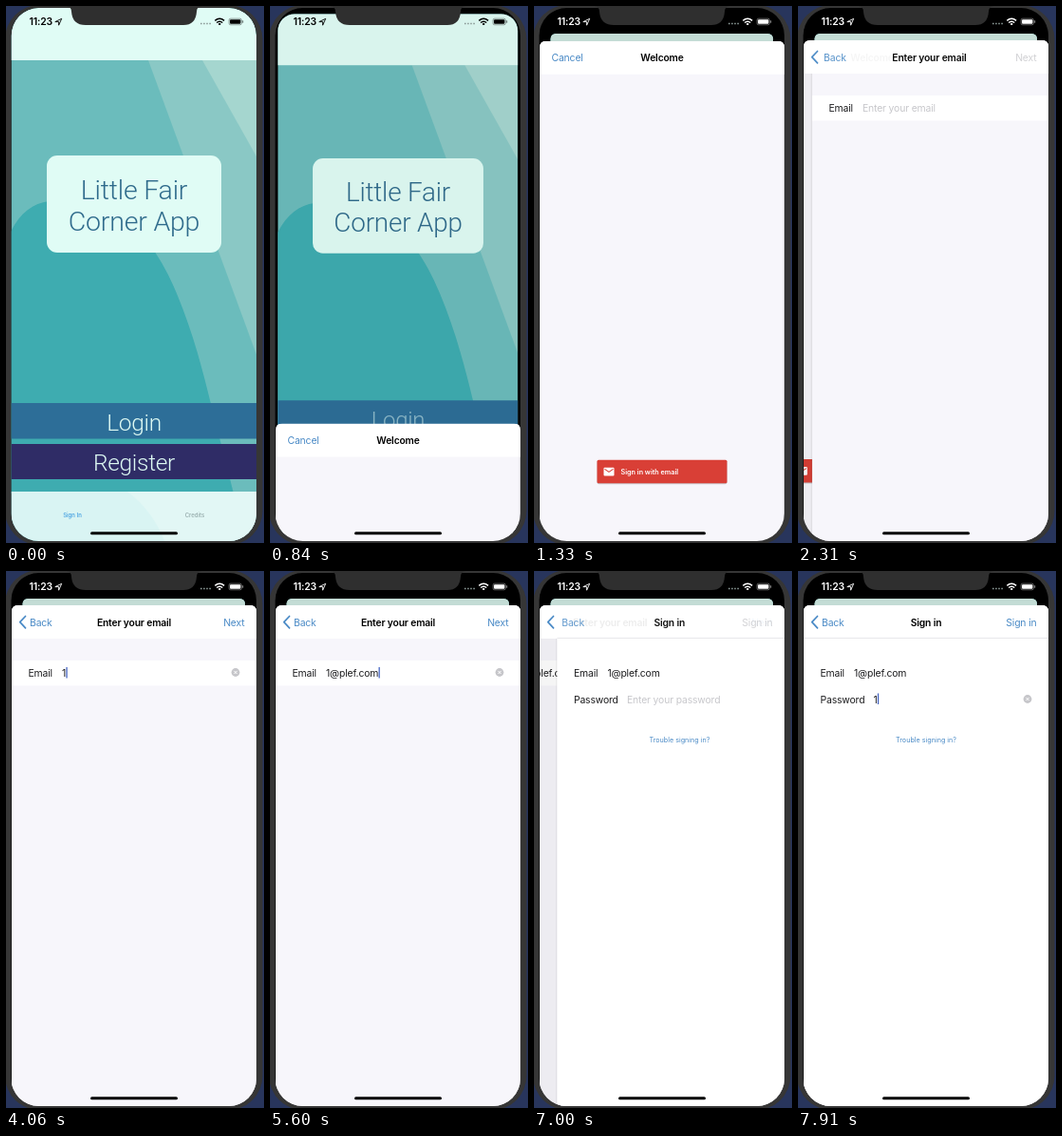
Animation, 272 px wide and 564 px high, one loop 8 s. Source, as an HTML page:

```html
<!DOCTYPE html>
<html lang="en">
<head>
<meta charset="utf-8">
<title>Sign-in walkthrough</title>
<style>
  html, body { margin: 0; width: 100%; height: 100%; overflow: hidden; background: #28355c; }
  svg { display: block; width: 272px; height: 564px; }
  text { font: 400 10.4px Inter, "Liberation Sans", sans-serif; fill: #1c1c1e; letter-spacing: -.15px; white-space: pre; }
  .blue { fill: #4a8ac6; }
  .off { fill: #cfcfd2; }
  .title { font-weight: 600; font-size: 10.3px; fill: #000; text-anchor: middle; }
  .end { text-anchor: end; }
  .hint { fill: #c7c7cb; }
  .thin { font: 300 28.5px Roboto, "Liberation Sans", sans-serif; letter-spacing: -.2px; text-anchor: middle; }
  .btn { font-size: 24.5px; letter-spacing: -.3px; fill: #dcf8f2; }
  .tiny { font-size: 6px; text-anchor: middle; letter-spacing: 0; }
</style>
</head>
<body>
<svg viewBox="0 0 272 564">
  <defs>
    <clipPath id="screen"><rect x="5.5" y="2" width="258.5" height="560" rx="29"/></clipPath>
    <clipPath id="sheetBox"><path d="M6 562V43q0-7 7-7H257q7 0 7 7V562z"/></clipPath>
    <clipPath id="homeBox"><rect id="homeRect" x="5.5" y="2" width="258.5" height="562" rx="6"/></clipPath>
    <clipPath id="backBox"><rect x="15" y="40" width="120" height="28"/></clipPath>
    <g id="clear">
      <circle r="4.4" fill="#c6c6ca"/>
      <path d="M-1.6-1.6 1.6 1.6M1.6-1.6-1.6 1.6" stroke="#fff" stroke-width="1"/>
    </g>
  </defs>

  <rect x="-1" y="-1" width="271.5" height="567" rx="36" fill="#363636"/>
  <g clip-path="url(#screen)">
    <rect width="272" height="564" fill="#000"/>

    <g id="home"><g clip-path="url(#homeBox)">
      <rect y="0" width="272" height="564" fill="#6bbcbc"/>
      <path d="M150 57 264 366V57z" fill="#8ac8c5"/>
      <path d="M207 57 264 158V57z" fill="#a5d6cf"/>
      <path d="M5 237C15 217 29 207 45 205C100 195 148 225 180 302C198 345 208 385 216 418L240 512H5z" fill="#3eacb0"/>
      <rect width="272" height="57" fill="#e0fcf5"/>
      <rect x="43" y="157" width="184" height="102" rx="11" fill="#e0fcf5"/>
      <text class="thin" x="135" y="203" fill="#2f6b8c" style="fill:#2f6b8c">Little Fair</text>
      <text class="thin" x="135" y="236" style="fill:#2f6b8c">Corner App</text>
      <rect y="417" width="272" height="37.500" fill="#2d6e98"/>
      <rect y="460" width="272" height="37" fill="#2f2c66"/>
      <text id="login" class="thin btn" x="135" y="446">Login</text>
      <text class="thin btn" x="135" y="488">Register</text>
      <rect y="510" width="272" height="54" fill="#d9f4f3"/>
      <path d="M128 510Q155 530 168 564H272V510z" fill="#e2f7f5"/>
      <text class="tiny" x="70" y="537" style="fill:#3c9be0;font-weight:500">Sign In</text>
      <text class="tiny" x="199" y="537" style="fill:#93a9a9;font-weight:500">Credits</text>
      <rect id="dim" width="272" height="564" opacity="0"/>
    </g></g>

    <g id="sheet"><g clip-path="url(#sheetBox)">
      <rect x="6" y="36" width="258" height="526" fill="#f7f6fb"/>

      <g id="page0">
        <rect x="66.500" y="477" width="137" height="24.500" rx="2" fill="#000" opacity=".2"/>
        <rect x="66.500" y="476" width="137" height="24.500" rx="1.500" fill="#d93f36"/>
        <rect x="73.500" y="484" width="11" height="8.800" rx="1" fill="#fff"/>
        <path d="M74.500 485.600 79 488.600 83.500 485.600" fill="none" stroke="#d93f36" stroke-width="1.100"/>
        <text x="91.500" y="491" style="font-size:7.200px;font-weight:600;fill:#fff;letter-spacing:0">Sign in with email</text>
      </g>
      <rect id="shade0" x="6" y="36" width="258" height="526" opacity="0"/>

      <g id="page1">
        <rect x="4.800" y="71" width="1.200" height="491" opacity=".07"/>
        <rect x="6" y="36" width="258" height="526" fill="#f7f6fb"/>
        <rect x="6" y="94" width="258" height="26.500" fill="#fff"/>
        <text x="23.500" y="110.500">Email</text>
        <text id="mailHint" class="hint" x="59" y="110.500">Enter your email</text>
        <text id="mail" x="59" y="110.500"></text>
        <rect id="mailCaret" y="101" width="1.300" height="11.500" fill="#4666c4"/>
        <use id="mailClear" href="#clear" x="242" y="106.500"/>
      </g>
      <rect id="shade1" x="6" y="36" width="258" height="526" opacity="0"/>

      <g id="page2">
        <rect x="4.800" y="71" width="1.200" height="491" opacity=".06"/>
        <rect x="6" y="36" width="258" height="526" fill="#fff"/>
        <text x="23.500" y="110.500">Email</text>
        <text id="mailDone" x="59" y="110.500"></text>
        <text x="23.500" y="138.500">Password</text>
        <text id="passHint" class="hint" x="79.500" y="138.500">Enter your password</text>
        <text id="pass" x="79.500" y="138.500"></text>
        <rect id="passCaret" y="128.500" width="1.300" height="11.500" fill="#4666c4"/>
        <use id="passClear" href="#clear" x="242" y="134.500"/>
        <text class="blue" x="135" y="180" style="font-size:7.200px;text-anchor:middle;letter-spacing:0">Trouble signing in?</text>
      </g>

      <rect x="6" y="36" width="258" height="35" fill="#fff"/>
      <rect id="rule" x="6" y="70.300" width="258" height=".7" fill="#dedee2"/>
      <text id="cancel" class="blue" x="18.500" y="57.500">Cancel</text>
      <text id="title0" class="title" x="135" y="57.500">Welcome</text>
      <text id="title1" class="title" x="135" y="57.500">Enter your email</text>
      <text id="title2" class="title" x="135" y="57.500">Sign in</text>
      <text id="next" class="end" x="251.500" y="57.500">Next</text>
      <text id="submit" class="end" x="251.500" y="57.500">Sign in</text>
      <g clip-path="url(#backBox)">
        <text id="back1" class="blue" x="25" y="57.500">Back</text>
        <text id="back2" class="blue" x="25" y="57.500">Back</text>
      </g>
      <path id="chevron" d="M20.500 47.500 14.700 53.700 20.500 59.900" fill="none" stroke="#4a8ac6" stroke-width="1.700" stroke-linecap="round" stroke-linejoin="round"/>
    </g></g>

    <g id="status">
      <text x="24.500" y="20.300" style="font-weight:600;font-size:10.400px;fill:inherit">11:23</text>
      <path d="M51.800 16.600 58.700 13.300 55.600 20.200V16.600z" fill="none" stroke="currentColor" stroke-width=".9" stroke-linejoin="round"/>
      <path d="M205 18.500h12" stroke="#8b9a97" stroke-width="1.500" stroke-dasharray="1.600 1.500"/>
      <g fill="none" stroke="currentColor" stroke-width="1.500">
        <path d="M220.300 15.400Q225.200 11.200 230.100 15.400M222.100 17.500Q225.200 14.900 228.300 17.500"/>
        <path d="M225.200 18v2" stroke-width="2"/>
      </g>
      <rect x="235" y="13.200" width="13.400" height="6.600" rx="1.800" fill="none" stroke="currentColor" stroke-width=".6" opacity=".6"/>
      <rect x="236" y="14.200" width="11.400" height="4.600" rx="1" fill="currentColor"/>
      <path d="M249.700 15.300v2.400" stroke="currentColor" stroke-width="1" opacity=".6"/>
    </g>
    <rect x="89" y="552.300" width="92" height="3" rx="1.500" fill="#000"/>
  </g>
  <path d="M64 0Q69 1 69 6Q70 20 84 20H187Q200 20 201 6Q201 1 206 0z" fill="#2f2f2f"/>
</svg>
<script>
  const LOOP = 8000, STEP = 70, WIDTH = 258;
  const ADDRESS = "1@plef.com";
  // [time, characters typed]
  const TYPING = [[3640, 1], [4130, 2], [4690, 3], [4900, 4], [5180, 5], [5390, 6], [5530, 10]];
  const CARET_ON = 3220, SUBMITTED = 6160, PASS_CARET = 7560, PASS_TYPED = 7910;

  const ui = {};
  document.querySelectorAll("[id]").forEach(el => ui[el.id] = el);
  ui.mailDone.textContent = ADDRESS;

  const clamp = v => Math.min(1, Math.max(0, v));
  const fade = (el, a) => el.setAttribute("opacity", clamp(a));
  const shift = (el, x, y = 0) => el.setAttribute("transform", `translate(${x} ${y})`);
  const place = (el, x, a) => { shift(el, x); fade(el, a); };

  // Critically damped spring, 0 to 1
  function spring(ms, rate) {
    const k = Math.max(0, ms) / 1000 * rate;
    return 1 - (1 + k) * Math.exp(-k);
  }

  function field(input, caret, hint, text, caretOn) {
    if (input.textContent !== text) input.textContent = text;
    fade(hint, text ? 0 : 1);
    const len = text ? input.getComputedTextLength() + .3 : 0;
    caret.setAttribute("x", +input.getAttribute("x") + len);
    fade(caret, caretOn ? 1 : 0);
  }

  function present(p) {
    const s = 1 - .093 * p;
    ui.home.setAttribute("transform", `translate(${135 * (1 - s)} ${27.2 * p}) scale(${s})`);
    ui.homeRect.setAttribute("rx", 29 - 23 * clamp(p * 2));
    fade(ui.dim, .13 * p);
    shift(ui.sheet, 0, 528 * (1 - p));
    const g = Math.round(255 * clamp((p - .4) * 2.5));
    ui.status.style.color = ui.status.style.fill = `rgb(${g},${g},${g})`;
  }

  function push(p, from, to, shade) {
    shift(to, WIDTH * (1 - p));
    if (p > 0) shift(from, -.3 * WIDTH * p);
    fade(shade, .042 * p);
  }

  function draw(t) {
    present(spring(t - 782, 16));
    fade(ui.login, 1 - .45 * clamp((t - 560) / 200));

    const a = spring(t - 1920, 13.3), b = spring(t - 6676, 13.3);
    push(a, ui.page0, ui.page1, ui.shade0);
    push(b, ui.page1, ui.page2, ui.shade1);
    ui.rule.setAttribute("transform", `translate(${WIDTH * (1 - b)} 0)`);

    fade(ui.cancel, 1 - 2 * a);
    place(ui.title0, -59 * a, 1 - a);
    place(ui.title1, 100 * (1 - a) - 59 * b, a * (1 - b));
    place(ui.title2, 109 * (1 - b), b);
    place(ui.back1, 60 * (1 - a) - 40 * b, (2 * a - 1) * (1 - b));
    place(ui.back2, 60 * (1 - b), 2 * b - 1);
    fade(ui.chevron, a);
    fade(ui.next, a * (1 - b));
    fade(ui.submit, b);

    const typed = TYPING.reduce((n, [at, count]) => t >= at ? count : n, 0);
    const editing = t >= CARET_ON && t < SUBMITTED;
    field(ui.mail, ui.mailCaret, ui.mailHint, ADDRESS.slice(0, typed), editing);
    fade(ui.mailClear, editing && typed ? 1 : 0);
    ui.next.setAttribute("class", typed ? "end blue" : "end off");

    const done = t >= PASS_TYPED;
    field(ui.pass, ui.passCaret, ui.passHint, done ? "1" : "", t >= PASS_CARET);
    fade(ui.passClear, done ? 1 : 0);
    ui.submit.setAttribute("class", done ? "end blue" : "end off");
  }

  function frame() {
    const t = (performance.now() + 20) % LOOP;
    draw(Math.floor(t / STEP) * STEP);
    requestAnimationFrame(frame);
  }
  frame();
</script>
</body>
</html>
```
